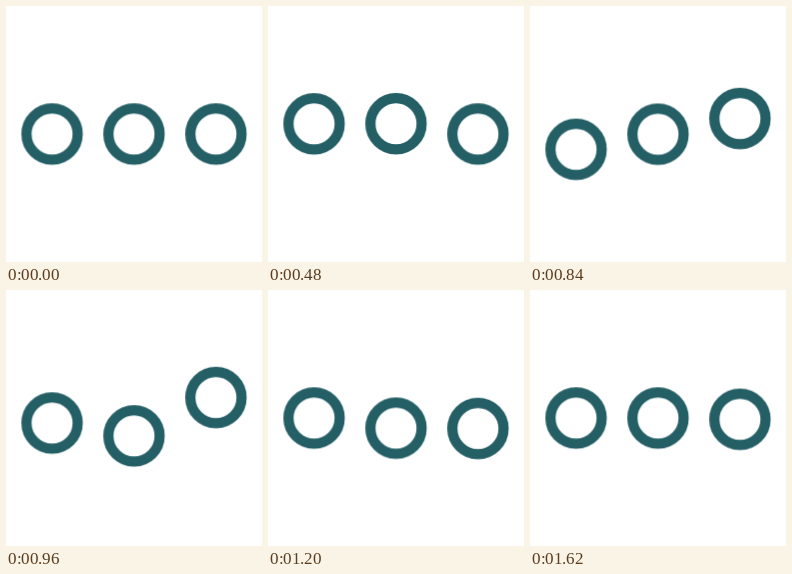
Recreate the animation shown at these times as an HTML page. Size 256x256 px, loop 1.68 s.

```html
<!DOCTYPE html>
<html lang="en">
<head>
<meta charset="utf-8">
<title>Loading</title>
<style>
  html, body {
    margin: 0;
    width: 100%;
    height: 100%;
    overflow: hidden;
    background: #fff;
  }
  svg {
    display: block;
    width: 100vw;
    height: 100vh;
  }
  circle {
    fill: none;
    stroke: #255f66;
    stroke-width: 4px;
    animation: wave 1680ms cubic-bezier(.37, 0, .63, 1) infinite;
  }
  circle:nth-child(2) { animation-delay: 300ms; }
  circle:nth-child(3) { animation-delay: 600ms; }

  /* up, down and back in 360 ms moves, then rest */
  @keyframes wave {
    0%, 64.2857%, 100% { transform: translateY(0); }
    21.4286% { transform: translateY(-8px); }
    42.8571% { transform: translateY(8px); }
  }
</style>
</head>
<body>
<svg viewBox="0 0 100 100">
  <circle cx="18" cy="50" r="10"/>
  <circle cx="50" cy="50" r="10"/>
  <circle cx="82" cy="50" r="10"/>
</svg>
</body>
</html>
```
